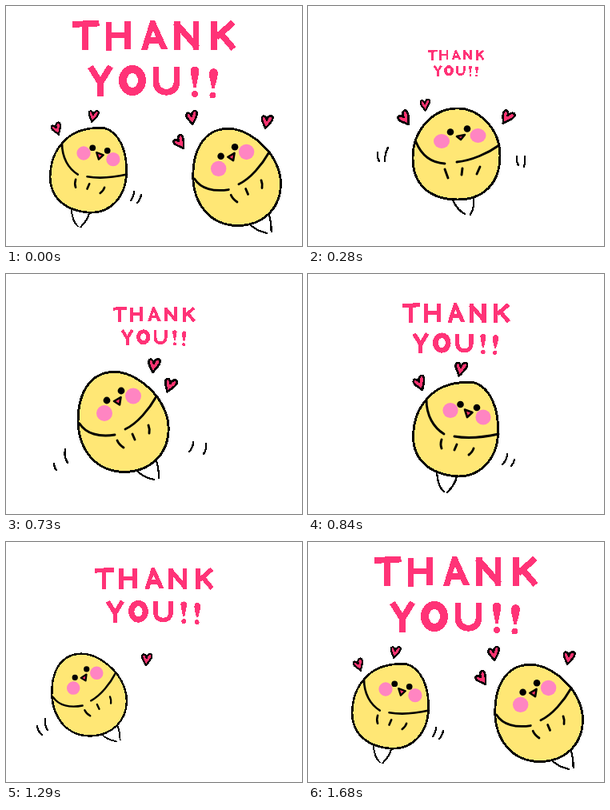
An HTML page for the animation above (1960 ms loop, 370 by 300 pixels).

```html
<!DOCTYPE html>
<html lang="en">
<head>
<meta charset="utf-8">
<title>Thank you</title>
<style>
  html, body { margin: 0; width: 100%; height: 100%; overflow: hidden; background: #fff; }
  svg { display: block; width: 370px; height: 300px; }

  /* Each scene is held for one seventh of the loop; the finale for two. */
  .scene { visibility: hidden; animation: hold 1960ms step-end infinite; animation-delay: calc(var(--n) * 280ms - 1960ms); }
  .finale { animation-name: hold-twice; animation-delay: -280ms; }
  @keyframes hold { 0% { visibility: visible; } 14.2857% { visibility: hidden; } }
  @keyframes hold-twice { 0% { visibility: visible; } 28.5714% { visibility: hidden; } }

  .line { fill: none; stroke: #000; stroke-width: 2.9; stroke-linecap: round; stroke-linejoin: round; }
  .thin { stroke-width: 2.3; }
  .body { fill: #ffe775; }
  .cheek { fill: #ff85c2; }
  .beak { fill: #ff3366; stroke: #000; stroke-width: 2.6; stroke-linejoin: round; }
  .heart { fill: #ff3370; stroke: #000; stroke-width: 2.7; stroke-linejoin: round; }
  .ink { fill: none; stroke: #ff3377; stroke-width: 7.8; }
  .ring { stroke-width: 10; }
  .solid { fill: #ff3377; }
  .thin, .body, .heart, .ink, .solid { shape-rendering: crispEdges; }
</style>
</head>
<body>
<svg viewBox="0 0 370 300" role="img" aria-label="Thank you!!">
  <defs>
    <!-- Hand lettering, centred on the origin -->
    <g id="thanks" transform="translate(-185.5 -66.5)">
      <path class="ink" d="M83 23L116.500 21.500M99 20V55
        M128.500 19.500V55.500M152 18.500V54M128 36.500H152
        M214 54.500V19M237.500 54.500V18.500M212 21L239 52
        M260 19V55M284 20.500L263 39M268 34L284.500 53.500
        M105.500 76L118 96L130.500 75.500M118 93V113
        M187.500 76V95C187.500 112 213.500 112 213.500 95V76"/>
      <ellipse class="ink ring" cx="158" cy="93" rx="12" ry="14"/>
      <path class="solid" fill-rule="evenodd" d="M169 54.500L180.500 18H186L202 53.500H193.500L190 46.500H179L177 54.500ZM184 31L180.500 39H187.500Z"/>
      <path class="solid" d="M236 76C241 76 242 79 241 84L237.500 102H234.500L231 84C230 79 231 76 236 76ZM259.500 78C265 78 266 84 263.500 92L260.500 103H257.500L254.500 90C253 82 255 78 259.500 78Z"/>
      <circle class="solid" cx="236" cy="110" r="4"/>
      <circle class="solid" cx="258.500" cy="111.500" r="4"/>
    </g>

    <path id="heart" class="heart" d="M0 9C-2 5 -7 1 -7.300 -3C-7.500 -7.500 -3 -8 -.5 -2C0 -8 4 -10 6.500 -7.500C8.500 -3 3 4 0 9Z"/>

    <g id="upright">
      <path class="line thin" d="M181 243C185 251 190 257 196 260M207 239C208 248 206 256 203 261"/>
      <path class="line body" d="M185 128C212 127 240 152 240 187C240 222 219 242 187 242C153 242 131 224 131 190C131 155 156 129 185 128Z"/>
      <path class="line" d="M135 170C142 187 155 196 171 197M186 195C205 193 225 184 239 174M171 204L175 215M193 203L192 211M215 201L211 210"/>
      <ellipse class="cheek" cx="167" cy="169" rx="10" ry="9"/>
      <ellipse class="cheek" cx="212.500" cy="162" rx="10" ry="9"/>
      <circle cx="178" cy="157.500" r="4.300"/>
      <circle cx="199" cy="153.500" r="4.300"/>
      <path class="beak" d="M186 163L196 161L191 167Z"/>
    </g>

    <g id="tilted">
      <path class="line thin" d="M163 245C168 251 176 255 185 257M187 231C190 238 191 247 191 255"/>
      <path class="line body" d="M133 122.500C155 121 177 138 190 155C200 170 204 186 203 198C201 226 180 247 148 247.500C112 247 91 220 90 184C90 150 104 124 133 122.500Z"/>
      <path class="line" d="M92 187C100 200 117 204 136 201M149 194C164 187 179 169 188 153M139 208Q141 213 147 217M158 200L161 207M178 189Q180 194 179 199"/>
      <circle class="cheek" cx="123" cy="174" r="10"/>
      <circle class="cheek" cx="159" cy="152.500" r="10"/>
      <circle cx="126" cy="158" r="4.400"/>
      <circle cx="144" cy="146" r="4.400"/>
      <path class="beak" d="M135 159L143.500 154L142 163.500Z"/>
    </g>

    <g id="bowed">
      <path class="line thin" d="M161 249C162 259 165 268 170 272M186 253Q184 263 174 273"/>
      <path class="line body" d="M148 157C160 142 180 134 207 135.500C228 142 239 168 237.500 200C236 232 215 253 188 253C152 251 131.500 232 131.500 203C132 184 138 168 148 157Z"/>
      <path class="line" d="M148 157C148 177 157 192 170 200M183 203C200 206 220 204 238 200M167 207Q165 213 167 218M186 213L183 220M207 218Q206 222 201 226"/>
      <circle class="cheek" cx="178" cy="170.500" r="9.600"/>
      <circle class="cheek" cx="219" cy="179" r="9.600"/>
      <circle cx="190.500" cy="163" r="4.300"/>
      <circle cx="211" cy="167" r="4.300"/>
      <path class="beak" d="M196 169.500L205.500 173L199 179Z"/>
    </g>

    <g id="leaning">
      <path class="line thin" d="M128 266C132 274 141 280 149 283M156 258C156 267 156 276 155 283"/>
      <path class="line body" d="M117 139.500C142 139 162 158 173 180C180 196 182 207 180.500 219C176 246 155 266 128 267C94 267 70 243 69.500 206C69 171 92 140 117 139.500Z"/>
      <path class="line" d="M71 193C80 208 95 217 112 218M125 213C142 207 160 194 174 181M114 226Q115 232 119 237M133 222L135 231M154 216Q156 220 154 225"/>
      <circle class="cheek" cx="104.500" cy="188.500" r="10"/>
      <circle class="cheek" cx="146" cy="173.500" r="10"/>
      <circle cx="110" cy="174" r="4.400"/>
      <circle cx="131" cy="166" r="4.400"/>
      <path class="beak" d="M119.500 177L129.500 174.500L126 181.500Z"/>
    </g>
  </defs>

  <g class="scene finale">
    <use href="#thanks" transform="translate(185.500 66.500)"/>
    <use href="#bowed" transform="translate(97 184) scale(.9) translate(-178 -170.500)"/>
    <use href="#tilted" transform="translate(288 214) scale(.97) translate(-146 -185)"/>
    <path class="line thin" d="M160 232Q160 238 156 243M169 236Q168 242 164 246"/>
    <use href="#heart" transform="translate(63.500 153.500) rotate(-18) scale(.83)"/>
    <use href="#heart" transform="translate(109 137.500) rotate(14) scale(.83)"/>
    <use href="#heart" transform="translate(232.500 139.500) rotate(-4) scale(.95)"/>
    <use href="#heart" transform="translate(217.500 170.500) rotate(-30) scale(.95)"/>
    <use href="#heart" transform="translate(326 144.500) rotate(12) scale(.95)"/>
  </g>

  <g class="scene" style="--n:1">
    <use href="#thanks" transform="translate(185.500 71.500) scale(.345)"/>
    <use href="#upright"/>
    <path class="line thin" d="M87 183Q86 189 89 194M100 177Q96 184 96 194M261 188Q260 194 263 199M271 188Q272 195 270 201"/>
    <use href="#heart" transform="translate(121 140.500) rotate(-32)"/>
    <use href="#heart" transform="translate(146.500 123.500) scale(.8)"/>
    <use href="#heart" transform="translate(249 139) rotate(35)"/>
  </g>

  <g class="scene" style="--n:2">
    <use href="#thanks" transform="translate(185.500 65.500) scale(.503)"/>
    <use href="#tilted"/>
    <path class="line thin" d="M60 237Q60 242 63 245M74 219Q72 228 77 236M234 210Q234 217 229 222M250 212Q251 219 247 225"/>
    <use href="#heart" transform="translate(185 114) rotate(10)"/>
    <use href="#heart" transform="translate(205 139) rotate(24)"/>
  </g>

  <g class="scene" style="--n:3">
    <use href="#thanks" transform="translate(185.500 68.500) scale(.662)"/>
    <use href="#bowed"/>
    <path class="line thin" d="M249 225Q249 232 243 238M258 232Q257 237 254 240"/>
    <use href="#heart" transform="translate(140 136.500) rotate(-18)"/>
    <use href="#heart" transform="translate(191 118.500) rotate(14)"/>
  </g>

  <g class="scene" style="--n:4">
    <use href="#thanks" transform="translate(185.500 67.500) scale(.728)"/>
    <use href="#tilted" transform="translate(103.500 191) rotate(-2) scale(.825) translate(-146 -185)"/>
    <path class="line thin" d="M39 230Q40 237 45 241M49 221Q48 229 52 235"/>
    <use href="#heart" transform="translate(176 146.500) rotate(8) scale(.85)"/>
  </g>

  <g class="scene" style="--n:5">
    <use href="#thanks" transform="translate(185.500 68) scale(.888)"/>
    <use href="#leaning"/>
    <path class="line thin" d="M26 238Q27 246 31 250M43 232Q42 239 46 245M200 208Q203 215 199 222M213 210Q216 217 211 224"/>
    <use href="#heart" transform="translate(72 141) rotate(-30)"/>
    <use href="#heart" transform="translate(178 141) rotate(24)"/>
  </g>
</svg>
</body>
</html>
```
